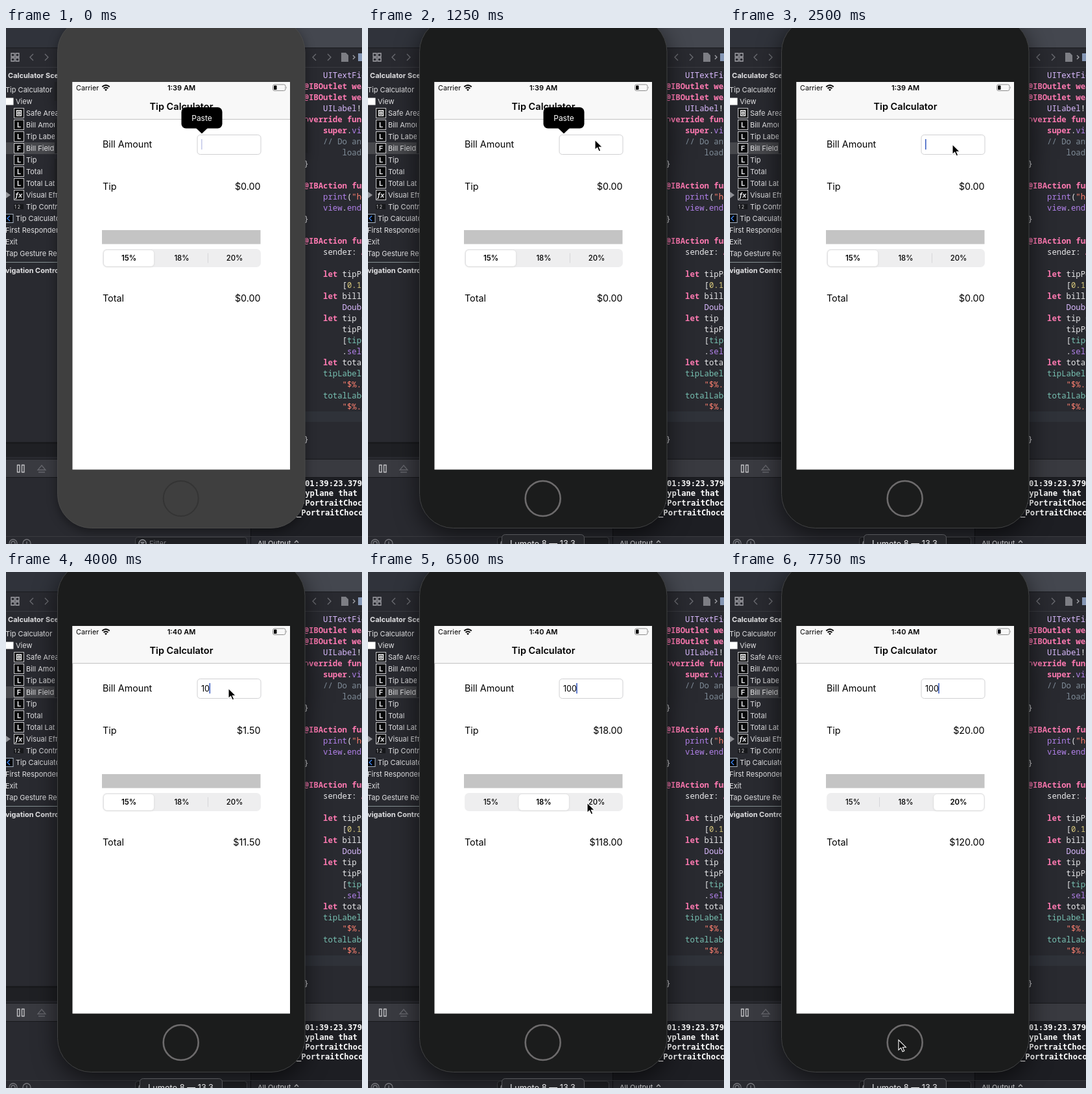
An HTML page for the animation above (8 s loop, 549x794 px).

```html
<!DOCTYPE html>
<html lang="en">
<head>
<meta charset="utf-8">
<title>Tip Calculator</title>
<style>
  html, body { margin: 0; width: 100%; height: 100%; overflow: hidden; background: #292a30; }
  svg { display: block; width: 549px; height: 794px; }
  text { font-family: Inter, sans-serif; white-space: pre; }
  .code text { font: 500 12.3px "Noto Sans Mono", monospace; }
  .console text { font: 700 12.2px "DejaVu Sans Mono", monospace; fill: #fff; }
  .tree text { font-size: 11px; fill: #e2e2e4; }
  .tree .head { font-weight: 700; }
  .app text { font-size: 14.3px; fill: #000; }
  .k { fill: #ff7ab2; font-weight: 700; }
  .p { fill: #b281eb; }
  .u { fill: #dabaff; }
  .c { fill: #7f8c98; }
  .s { fill: #ff8170; }
  .n { fill: #d9c97c; }
  .g { fill: #78c2b3; }
  .w { fill: #e8e8ea; }
  .line { fill: none; stroke-width: 1.3; }
  #phone { filter: drop-shadow(0 5px 8px #0006); }
  #phone.active { filter: drop-shadow(0 10px 18px #0009); }
  #body { fill: #3f3f3f; stroke: #4a4a4a; }
  .active #body { fill: #1b1c1c; stroke: #414243; }
  #home { fill: none; stroke: #343434; stroke-width: 2; }
  .active #home { stroke: #6d6b6c; stroke-width: 2.6; }
  #caret { fill: #c6cbea; }
  .active #caret { fill: #4062c4; }
</style>
</head>
<body>
<svg viewBox="0 0 549 794">
  <!-- editor window -->
  <rect width="549" height="794" fill="#292a30"/>
  <rect width="549" height="30" fill="#30333b"/>
  <rect x="440" width="109" height="30" fill="#44474f"/>
  <path d="M0 30.5H549" stroke="#1b1c20"/>
  <path d="M0 60.5H80M460 60.5H549" stroke="#3a3b41"/>
  <g class="line" stroke="#a2a3a8">
    <path d="M8 39h5v5h-5zM15 39h5v5h-5zM8 46h5v5h-5zM15 46h5v5h-5z"/>
    <path d="M42 40l-5 5 5 5M60 40l5 5-5 5M478 40l-5 5 5 5M496 40l5 5-5 5" stroke="#6c6d73"/>
    <path d="M535 42l3 3-3 3"/>
  </g>
  <path d="M517 38h7l4 4v10h-11z" fill="#7d7e84"/>
  <path d="M543 39h6v12h-6z" fill="#8496b4"/>

  <rect y="176" width="80" height="18" fill="#47484c"/>
  <path d="M0 360.5H80" stroke="#879294"/>
  <g class="tree" id="tree"></g>
  <path d="M0 107.500h11.500v11H0z" fill="#fff"/>
  <path d="M0 252l7 5-7 5z" fill="#8f9095"/>
  <rect x="-3" y="286.500" width="14" height="13" fill="#050608" stroke="#a9b5c5"/>
  <path d="M6 289l-4 4 4 4" class="line" stroke="#3b86f7"/>

  <rect y="637" width="80" height="3" fill="#1a1b1e"/>
  <rect y="640" width="80" height="20" fill="#1f2024"/>
  <rect y="663" width="549" height="29" fill="#393a40"/>
  <path d="M0 663.500H549M0 691.500H549" stroke="#18191c"/>
  <rect x="378" y="692" width="171" height="91" fill="#1d1e23"/>
  <path d="M377.500 692V794" stroke="#111216"/>
  <path d="M0 782.500H549" stroke="#3a3b40"/>
  <path d="M17.500 672.500h3.500v11h-3.500zM24.500 672.500h3.500v11h-3.500z" class="line" stroke="#c5c5c8"/>
  <path d="M55 673l6 7h-12zM50 683.500h10" class="line" stroke="#65666c"/>
  <g class="line" stroke="#75767b">
    <circle cx="11" cy="793" r="6"/><circle cx="11" cy="793" r="3"/>
    <circle cx="32" cy="793" r="6"/><path d="M32 790v6"/>
  </g>
  <rect x="199.500" y="783.500" width="172" height="20" rx="4" fill="#1f2024" stroke="#45464b"/>
  <g class="line" stroke="#a4a5aa"><circle cx="210.500" cy="793" r="5.500"/><path d="M207.500 791.500h6M208.500 794h4"/></g>
  <text x="221" y="797" font-size="11" fill="#77787d">Filter</text>
  <text x="388" y="797" font-size="11" fill="#dcdcde">All Output</text>
  <path d="M445 792l3-3 3 3" class="line" stroke="#b5b5b8"/>

  <rect x="440" y="590" width="109" height="16" fill="#2f3239"/>
  <g class="code" id="code"></g>
  <g class="console">
    <text x="461" y="705">01:39:23.379</text>
    <text x="446.500" y="720">keyplane that</text>
    <text x="454" y="735">-PortraitChoc</text>
    <text x="448" y="750">_PortraitChoco</text>
  </g>

  <!-- simulator -->
  <g id="phone">
    <path d="M75 83h5v29h-5zM75 140h5v53h-5zM75 201h5v53h-5zM460 139h5v53h-5z" fill="#1d1e21"/>
    <rect id="body" x="79.500" y="-15.500" width="381.500" height="785" rx="52"/>
    <circle id="home" cx="269.700" cy="724" r="27"/>
    <rect x="102.500" y="83" width="335.500" height="596.500" fill="#fff"/>
    <rect x="102.500" y="83" width="335.500" height="57" fill="#f8f8f8"/>
    <path d="M102.500 140.500H438" stroke="#c2c2c2"/>
    <g class="app">
      <text x="108" y="96" style="font-size:10.800px">Carrier</text>
      <g fill="none" stroke="#000" stroke-width="2">
        <path d="M148.300 90.500q5.700-5 11.400 0M150.600 93q3.400-3 6.800 0"/>
      </g>
      <path d="M152 94.800q2-1.500 4 0l-2 2.200z"/>
      <text id="clock" x="270.500" y="96" text-anchor="middle" style="font-size:11px;font-weight:600"></text>
      <rect x="411.500" y="87" width="19.500" height="9.500" rx="2.500" fill="none" stroke="#8d8d8d"/>
      <rect x="413" y="88.500" width="4.500" height="6.500" rx="1"/>
      <path d="M432.300 90v3.500q1.500-1.700 0-3.500" fill="#8d8d8d"/>
      <text x="270.500" y="126" text-anchor="middle" style="font-size:14.500px;font-weight:600">Tip Calculator</text>
      <text x="149" y="183.500">Bill Amount</text>
      <text x="149" y="248.500">Tip</text>
      <text x="149" y="420.500">Total</text>
      <text id="tip" x="392.500" y="248.500" text-anchor="end"></text>
      <text id="total" x="392.500" y="420.500" text-anchor="end"></text>
      <rect x="295" y="164.500" width="98" height="30" rx="4.500" fill="#fff" stroke="#d0d0d2"/>
      <text id="bill" x="301" y="184" style="font-size:12.600px"></text>
      <rect id="caret" y="171" width="1.600" height="16"/>
      <rect x="148" y="311" width="244.500" height="21.500" fill="#c4c4c4"/>
      <rect x="149" y="340" width="244" height="28" rx="6.500" fill="#eeeeef"/>
      <path id="split0" d="M230.500 346.500v15" stroke="#d6d6d9"/>
      <path id="split1" d="M311.500 346.500v15" stroke="#d6d6d9"/>
      <rect id="thumb" y="341.500" width="78" height="25.500" rx="5.500" fill="#fff" stroke="#00000010"
            style="filter:drop-shadow(0 1px 1.500px #0001)"/>
      <g id="rates"></g>
      <g id="paste">
        <rect x="270.500" y="122" width="63" height="32.500" rx="7"/>
        <path d="M293 154h18l-9 8.500z"/>
        <text x="302" y="143" text-anchor="middle" style="font-size:12px;fill:#fff">Paste</text>
      </g>
    </g>
  </g>

  <g id="label">
    <rect x="206.500" y="779.500" width="127" height="30" rx="5" fill="#25262a" stroke="#56575b"/>
    <text x="219" y="798" font-size="12.800" fill="#e6e6e8">Lumeto 8 — 13.3</text>
  </g>
  <path id="cursor" d="M0 0V15.500L3.600 12.200 6.200 18 8.800 16.800 6.300 11.200H11.200Z" fill="#000" stroke="#fff" stroke-width="1.100"/>
</svg>
<script>
const $ = id => document.getElementById(id);
const set = (id, attrs) => Object.entries(attrs).forEach(([key, value]) => $(id).setAttribute(key, value));
const show = (id, on) => { $(id).style.display = on ? '' : 'none'; };

// Outline rows: centre y, x, label, icon letter
const rows = [
  [95, -1, 'Tip Calculator'], [113, 15, 'View'], [131, 31, 'Safe Area', '⊡'],
  [149, 31, 'Bill Amount', 'L'], [167, 31, 'Tip Label', 'L'], [185, 31, 'Bill Field', 'F'],
  [203, 31, 'Tip', 'L'], [221, 31, 'Total', 'L'], [239, 31, 'Total Label', 'L'],
  [257, 31, 'Visual Effect', 'fx'], [275, 31, 'Tip Control', '1 2'],
  [293, 15, 'Tip Calculator'], [311, -1, 'First Responder'], [329, -1, 'Exit'], [347, -1, 'Tap Gesture Rec']
];
const icon = (y, mark) => {
  if (mark === '1 2') return `<rect x="12" y="${y - 4}" width="15" height="8" fill="#17181b"/>
    <text x="13" y="${y + 3}" style="font-size:7px">1 2</text>`;
  const glyph = mark === '⊡'
    ? `<path d="M16.500 ${y - 4}h7v8h-7zM18.500 ${y - 1.500}h3v3h-3z" class="line" stroke="#fff"/>`
    : `<text x="20" y="${y + 4}" text-anchor="middle" style="font-weight:700;font-style:${mark === 'fx' ? 'italic' : 'normal'}">${mark}</text>`;
  return `<rect x="12.500" y="${y - 7.5}" width="15" height="15" fill="#08090a" stroke="#c9c9cc"/>${glyph}`;
};
$('tree').innerHTML =
  '<text class="head" x="3" y="77">Calculator Scene</text><text class="head" x="-1" y="377">vigation Controll</text>' +
  rows.map(([y, x, label, mark]) => `<text x="${x}" y="${y + 4}">${label}</text>${mark ? icon(y, mark) : ''}`).join('');

// Code lines: centre y, indent, then "class:text" runs
const lines = [
  [72, 4, 'u:UITextField'], [89, 0, 'k:@IBOutlet weak'], [106, 0, 'k:@IBOutlet weak'],
  [123, 4, 'u:UILabel', 'w:!'], [140, 0, 'k:override func'], [157, 4, 'k:super', 'w:.', 'p:view'],
  [174, 4, 'c:// Do any'], [191, 8, 'c:loading'], [208, 0, 'w:}'],
  [242, 0, 'k:@IBAction func'], [259, 4, 'p:print', 'w:(', 's:"hello'], [276, 4, 'p:view', 'w:.', 'p:end'],
  [293, 0, 'w:}'], [327, 0, 'k:@IBAction func'], [344, 4, 'w:sender: ', 'k:Any'],
  [378, 4, 'k:let ', 'w:tipPer'], [395, 8, 'w:[', 'n:0.15'], [412, 4, 'k:let ', 'w:bill'],
  [429, 8, 'u:Double'], [446, 4, 'k:let ', 'w:tip ='], [463, 8, 'w:tipPer'], [480, 8, 'w:[', 'g:tipCon'],
  [497, 8, 'w:.', 'p:selec'], [514, 4, 'k:let ', 'w:total'], [531, 4, 'g:tipLabel'], [548, 8, 's:"$%.2f'],
  [565, 4, 'g:totalLabel'], [582, 8, 's:"$%.2f'], [632, 0, 'w:}']
];
$('code').innerHTML = lines.map(([y, indent, ...runs]) =>
  `<text x="${459.5 + indent * 7.38}" y="${y + 4.5}">` +
  runs.map(run => `<tspan class="${run[0]}">${run.slice(2)}</tspan>`).join('') + '</text>').join('');

const rates = [15, 18, 20];
$('rates').innerHTML = rates.map((rate, i) =>
  `<text x="${189.5 + 81.5 * i}" y="358" text-anchor="middle" style="font-size:11.400px">${rate}%</text>`).join('');

// Each step overrides part of the state from its time on
const steps = [
  [0, { active: false, label: false, paste: true, caret: true, clock: '1:39', bill: '', pick: 0, thumb: 0, cursor: null }],
  [750, { label: true, cursor: [424, 172] }],
  [1000, { cursor: [350, 171] }],
  [1250, { active: true, caret: false, cursor: [350, 172] }],
  [1500, { caret: true }],
  [1750, { paste: false, cursor: [347, 176] }],
  [2000, { caret: false, cursor: [343, 179] }],
  [2500, { caret: true }],
  [3000, { caret: false, clock: '1:40' }],
  [3500, { caret: true }],
  [3750, { bill: '1' }],
  [4000, { bill: '10' }],
  [4500, { bill: '100' }],
  [5000, { cursor: [340, 218] }],
  [5250, { caret: false, cursor: [302, 318] }],
  [5500, { cursor: [278, 354] }],
  [5750, { caret: true, pick: 1, thumb: 0.6 }],
  [6000, { thumb: 1 }],
  [6250, { caret: false, cursor: [296, 356] }],
  [6500, { caret: true, cursor: [338, 355] }],
  [6750, { cursor: [350, 355] }],
  [7000, { caret: false, pick: 2, thumb: 1.6 }],
  [7250, { thumb: 2 }],
  [7500, { caret: true, cursor: [312, 526] }],
  [7750, { cursor: [260, 720] }]
];
const caretX = [301, 306, 313.5, 321.2];
const money = value => '$' + value.toFixed(2);

function render(time) {
  const state = Object.assign({}, ...steps.filter(([start]) => start <= time).map(([, change]) => change));
  const amount = Number(state.bill), tip = amount * rates[state.pick] / 100;
  $('phone').classList.toggle('active', state.active);
  ['label', 'paste', 'caret', 'cursor'].forEach(id => show(id, state[id]));
  $('clock').textContent = state.clock + ' AM';
  $('bill').textContent = state.bill;
  $('tip').textContent = money(tip);
  $('total').textContent = money(amount + tip);
  set('caret', { x: caretX[state.bill.length] });
  set('thumb', { x: 150.5 + 81.7 * state.thumb });
  show('split0', state.pick === 2);
  show('split1', state.pick === 0);
  [...$('rates').children].forEach((text, i) => { text.style.fontWeight = i === state.pick ? 600 : 450; });
  if (state.cursor) set('cursor', { transform: `translate(${state.cursor})` });
}

const began = performance.now();
let shown = -1;
function tick() {
  const time = Math.floor((performance.now() - began) % 8000 / 250) * 250;
  if (time !== shown) render(shown = time);
  requestAnimationFrame(tick);
}
tick();
</script>
</body>
</html>
```
